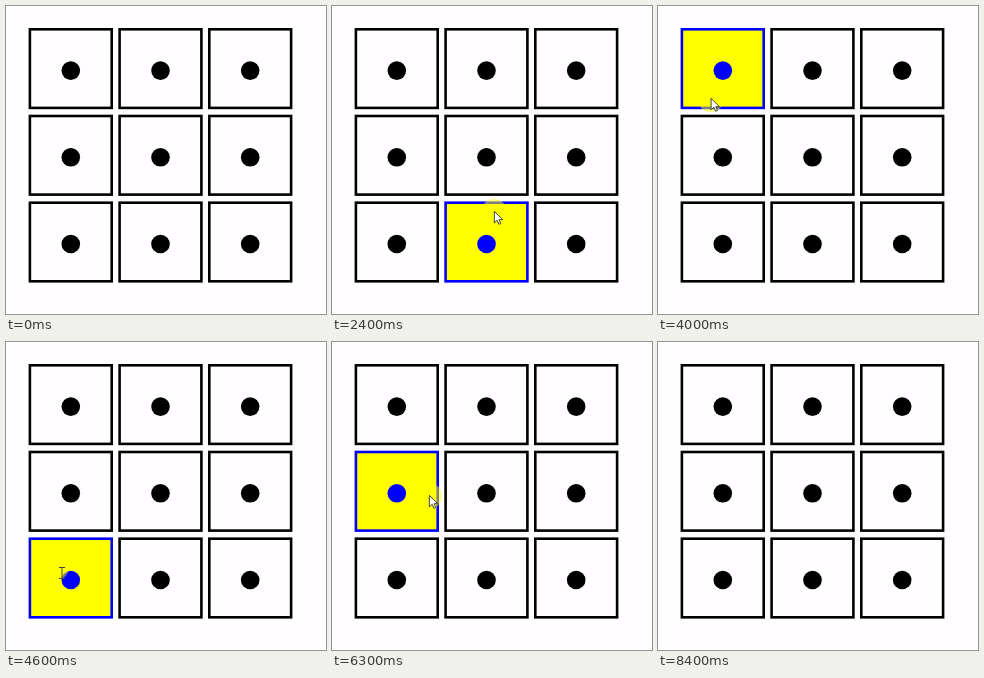
Recreate the animation shown at these times as an HTML page with a canvas. Size 320x308 px, loop 8.5 s.

```html
<!DOCTYPE html>
<html>
<head>
<meta charset="utf-8">
<style>
  html, body { margin: 0; width: 100%; height: 100%; overflow: hidden; background: #fffdff; }
  canvas { display: block; }
</style>
</head>
<body>
<canvas id="stage" width="320" height="308"></canvas>
<script>
const ctx = document.getElementById('stage').getContext('2d');
const LOOP = 8500, STEP = 100;
const PAPER = '#fffdff';
const cell = { x: 22.6, y: 22, w: 84.4, h: 81.2, dx: 89.7, dy: 86.7, border: 2.6 };

// Turning points of the pointer's tour over the grid
const tour = [
  { t: 1600, x: 250, y: 255 },
  { t: 2400, x: 162, y: 206 },
  { t: 3300, x: 152, y: 76 },
  { t: 3800, x: 70, y: 60 },
  { t: 4600, x: 50, y: 225 },
  { t: 5000, x: 240, y: 242 },
  { t: 5300, x: 241, y: 102 },
  { t: 5600, x: 190, y: 50 },
  { t: 6300, x: 97, y: 154 },
  { t: 6800, x: 306, y: 262 }
];

// Smooth curve through the turning points (cubic Hermite)
function pointerAt(t) {
  const last = tour.length - 1;
  if (t < tour[0].t || t > tour[last].t) return null;
  const i = Math.max(1, tour.findIndex(p => p.t >= t));
  const a = tour[i - 1], b = tour[i];
  const before = tour[Math.max(0, i - 2)], after = tour[Math.min(last, i + 1)];
  const span = b.t - a.t, s = (t - a.t) / span;
  const curve = axis => {
    const va = (b[axis] - before[axis]) / (b.t - before.t) * span;
    const vb = (after[axis] - a[axis]) / (after.t - a.t) * span;
    return a[axis] + (b[axis] - a[axis]) * s * s * (3 - 2 * s)
      + va * s * (1 - s) ** 2 - vb * s * s * (1 - s);
  };
  return { x: curve('x'), y: curve('y') };
}

function disc(x, y, r, color) {
  ctx.fillStyle = color;
  ctx.beginPath();
  ctx.arc(x, y, r, 0, 2 * Math.PI);
  ctx.fill();
}

// Draws one cell; returns true when the pointer is over its text
function drawCell(col, row, pointer) {
  const { w, h, border } = cell;
  const x = cell.x + col * cell.dx, y = cell.y + row * cell.dy;
  const cx = x + w / 2, cy = y + h / 2 + 2;
  const active = pointer && pointer.x >= x && pointer.x <= x + w
    && pointer.y >= y && pointer.y <= y + h;
  const ink = active ? '#00f' : '#000';
  ctx.fillStyle = ink;
  ctx.fillRect(x, y, w, h);
  ctx.fillStyle = active ? '#ff0' : PAPER;
  ctx.fillRect(x + border, y + border, w - 2 * border, h - 2 * border);
  disc(cx, cy, 9.3, ink);
  return active && Math.abs(pointer.x - cx) < 20 && Math.abs(pointer.y - cy) < 28;
}

function drawArrow(x, y) {
  ctx.save();
  ctx.translate(x, y);
  ctx.scale(0.7, 0.7);
  const shape = new Path2D('M0.5 0.5V17L4.5 13.3L7 19L9.6 17.9L7.2 12.4H12.5Z');
  ctx.fillStyle = '#fff';
  ctx.fill(shape);
  ctx.strokeStyle = '#222';
  ctx.lineWidth = 1.2;
  ctx.stroke(shape);
  ctx.restore();
}

function drawTextCursor(x, y) {
  ctx.strokeStyle = '#444';
  ctx.lineWidth = 1;
  ctx.stroke(new Path2D(
    `M${x - 3} ${y - 5.5}h6M${x} ${y - 5.5}v11M${x - 3} ${y + 5.5}h6`));
}

function draw(now) {
  const pointer = pointerAt(Math.floor((now % LOOP) / STEP) * STEP);
  let overText = false;
  ctx.fillStyle = PAPER;
  ctx.fillRect(0, 0, 320, 308);
  for (let row = 0; row < 3; row++)
    for (let col = 0; col < 3; col++)
      overText = drawCell(col, row, pointer) || overText;
  if (!pointer) return;
  const { x, y } = pointer;
  disc(x, y, 13, 'rgba(255,255,0,0.5)');
  if (overText) drawTextCursor(x + 6, y + 6);
  else drawArrow(x, y - 1);
}

const start = performance.now();
(function tick() {
  draw(performance.now() - start);
  requestAnimationFrame(tick);
})();
</script>
</body>
</html>
```
